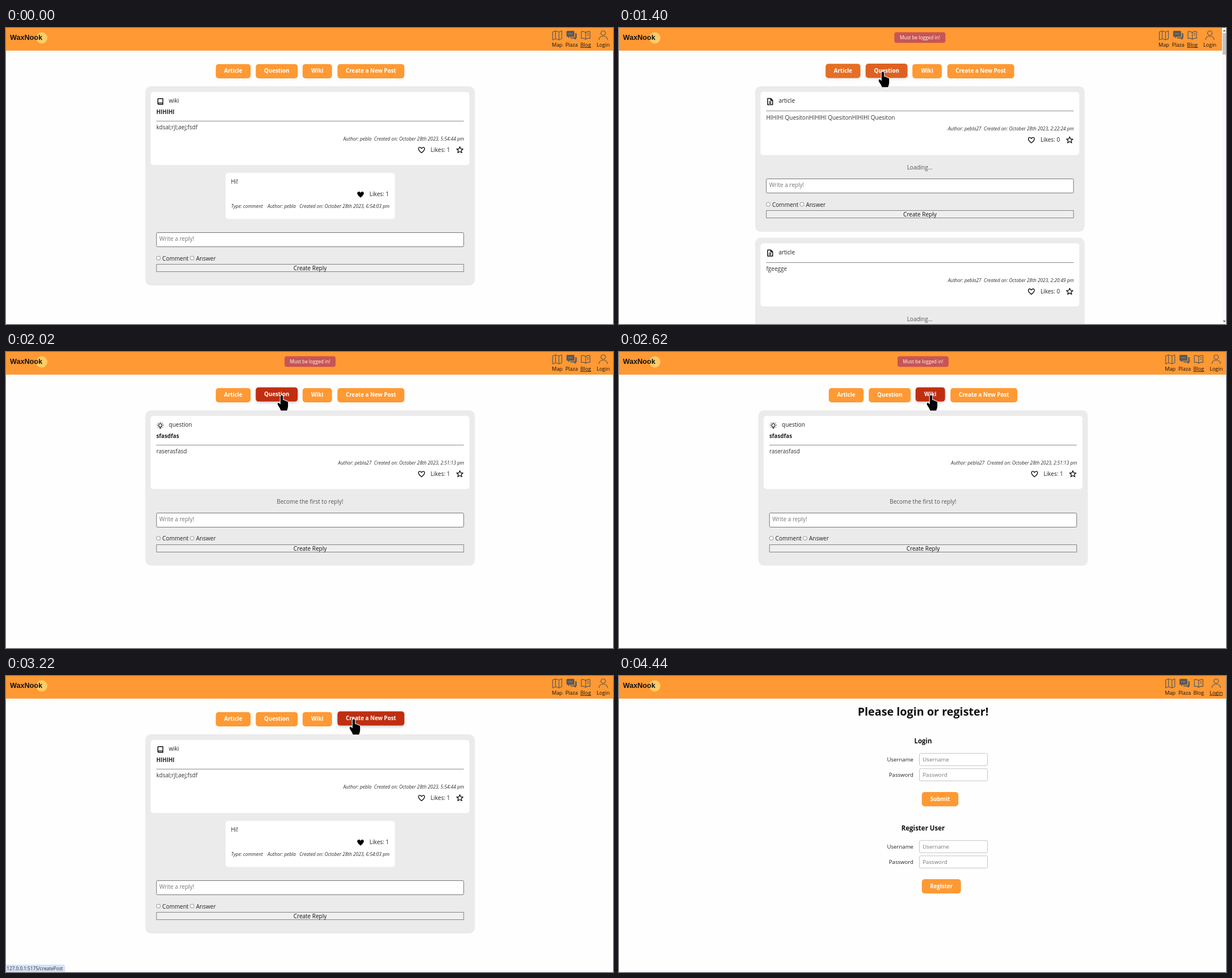
Recreate the animation shown at these times as an HTML page with a canvas. Size 1070 by 523 pixels, loop 5.04 s.

```html
<!DOCTYPE html>
<html lang="en">
<head>
<meta charset="utf-8">
<title>Blog walkthrough</title>
<style>
html, body { margin: 0; width: 100%; height: 100%; overflow: hidden; background: #fff; }
canvas { display: block; }
</style>
</head>
<body>
<canvas id="stage" width="1070" height="523"></canvas>
<script>
const ctx = document.getElementById('stage').getContext('2d');
const LOOP = 5040;
const ORANGE = '#ff9933';
const SANS = '"Open Sans", "Noto Sans", sans-serif';
const REG = `10px ${SANS}`;
const FORM = `9.65px ${SANS}`;
const BOLD = `bold 9.75px ${SANS}`;
const META = `italic 8.35px ${SANS}`;
const NAV = `9.1px ${SANS}`;

const POSTS = {
  wiki: [{
    kind: 'wiki', title: 'HIHIHI', body: 'kdsal;rjl;aej;fsdf', author: 'pebla',
    date: 'October 28th 2023, 5:54:44 pm', likes: 1, comment: true
  }],
  question: [{
    kind: 'question', title: 'sfasdfas', body: 'raserasfasd', author: 'pebla27',
    date: 'October 28th 2023, 2:51:13 pm', likes: 1
  }],
  article: [{
    kind: 'article', body: 'HIHIHI Quesiton'.repeat(3), author: 'pebla27',
    date: 'October 28th 2023, 2:22:24 pm', likes: 0
  }, {
    kind: 'article', body: 'fgeegge', author: 'pebla27',
    date: 'October 28th 2023, 2:20:49 pm', likes: 0
  }]
};

// hover: [article, question, wiki, create], 0 = idle, 1 = fully hovered
const STEPS = [
  { t: 0, page: 'wiki' },
  { t: 200, page: 'wiki', arrow: [875, 370] },
  { t: 400, page: 'wiki', arrow: [566, 164] },
  { t: 600, page: 'wiki', arrow: [470, 107] },
  { t: 800, page: 'wiki', arrow: [374, 73] },
  { t: 1000, page: 'wiki', hand: [418, 80], hover: [1, 0, 0, 0] },
  { t: 1400, page: 'article', hand: [465, 78], hover: [.4, .52, 0, 0], toast: true, loading: true },
  { t: 1600, page: 'article', hand: [486, 77], hover: [0, .92, 0, 0], toast: true },
  { t: 1800, page: 'article', hand: [486, 77], hover: [0, 1, 0, 0], toast: true },
  { t: 2020, page: 'question', hand: [486, 77], hover: [0, 1, 0, 0], toast: true },
  { t: 2220, page: 'question', hand: [534, 77], hover: [0, .4, .5, 0], toast: true },
  { t: 2420, page: 'question', hand: [550, 77], hover: [0, 0, .92, 0], toast: true },
  { t: 2620, page: 'question', hand: [550, 77], hover: [0, 0, 1, 0], toast: true },
  { t: 2820, page: 'wiki', hand: [596, 77], hover: [0, 0, .4, .5], toast: true },
  { t: 3020, page: 'wiki', hand: [613, 77], hover: [0, 0, 0, 1], status: 104, ink: .5 },
  { t: 3220, page: 'wiki', hand: [613, 77], hover: [0, 0, 0, 1], status: 104, ink: 1 },
  { t: 3420, page: 'login', arrow: [613, 76], status: 356, ink: 1 },
  { t: 3840, page: 'login', arrow: [613, 76] },
  { t: 4040, page: 'login', arrow: [912, 393] },
  { t: 4240, page: 'login', arrow: [983, 451] },
  { t: 4440, page: 'login' }
];

const TABS = [
  ['Article', 370, 61], ['Question', 440.5, 73.5], ['Wiki', 523, 51.5], ['Create a New Post', 584.5, 117.5]
];

const shape = d => new Path2D(d);
const ICONS = {
  heart: shape('M0 5C-7 0-6-4.6-3.2-4.6C-1.6-4.6-.6-3.6 0-2.6C.6-3.6 1.6-4.6 3.2-4.6C6-4.6 7 0 0 5Z'),
  star: shape('M0-5.6L1.6-1.8L5.7-1.5L2.6 1.2L3.6 5.2L0 3L-3.6 5.2L-2.6 1.2L-5.7-1.5L-1.6-1.8Z'),
  wiki: shape('M-4.3 3.6V-4Q-4.3-5.2-3-5.2H4.5V5H-3Q-4.3 5-4.3 3.6Q-4.3 2.4-3 2.4H4.5'),
  article: shape('M-4.4-5.4H1.2L4.4-2.2V5.5H-4.4ZM1-5.2V-2H4.2M-2 .4H2M-2 3H2'),
  question: shape('M-1.3 3.2V2A2.9 2.9 0 1 1 1.3 2V3.2ZM-1.2 5.2H1.2M0-6V-4.7M-6-.8H-4.6M6-.8H4.6M-4.4-4.7L-3.5-3.8M4.4-4.7L3.5-3.8M-4.5 3.4L-3.6 2.6M4.5 3.4L3.6 2.6'),
  map: shape('M-8-6L-3-8L3-6L8-8V6L3 8L-3 6L-8 8ZM-3-8V6M3-6V8'),
  chat: shape('M-9-8H3.5Q5-8 5-6.5V1Q5 2.5 3.5 2.5H-3L-6 5V2.5H-7.5Q-9 2.5-9 1V-6.5Q-9-8-7.5-8ZM6.4-4H7.5Q9-4 9-2.5V4Q9 5.5 7.5 5.5V8L4 5.5H-1Q-2.4 5.5-2.6 3.8H4Q6.4 3.8 6.4 1.5Z'),
  book: shape('M0-5Q-3-7.4-7.6-6.6V5.4Q-3 4.6 0 7Q3 4.6 7.6 5.4V-6.6Q3-7.4 0-5V7M2.5-2.8L5.4-3.5M2.5 0L5.4-.7'),
  user: shape('M4-4A4 4 0 1 1-4-4A4 4 0 1 1 4-4ZM-7.5 8Q-7 1.5 0 1.5Q7 1.5 7.5 8'),
  arrow: shape('M0 0V21L5 17L8.3 24.2L11.6 22.7L8.5 15.7H15.5Z'),
  hand: shape('M-2.2 1.4Q-2-.7 0-.7Q2-.7 2.2 1.4V8.2Q4.8 7.2 5.6 9.2Q8 8.4 8.6 10.4Q11.2 9.8 11.2 12.4V19Q10.8 22.4 9.2 26.4H-1.4Q-2.8 22.4-6.8 16.8Q-8.2 13.6-6 12.8Q-4.4 12.6-2.2 15.8Z')
};

function text(str, x, y, font = REG, color = '#222', align = 'left') {
  ctx.font = font;
  ctx.fillStyle = color;
  ctx.textAlign = align;
  ctx.fillText(str, x, y);
}

function box(x, y, w, h, r, fill, line, width = 1) {
  ctx.beginPath();
  ctx.roundRect(x, y, w, h, r);
  if (fill) { ctx.fillStyle = fill; ctx.fill(); }
  if (line) { ctx.strokeStyle = line; ctx.lineWidth = width; ctx.stroke(); }
}

function icon(name, x, y, { fill, line, width = 1.4 }) {
  ctx.save();
  ctx.translate(x, y);
  ctx.lineJoin = 'round';
  if (line) { ctx.strokeStyle = line; ctx.lineWidth = width; ctx.stroke(ICONS[name]); }
  if (fill) { ctx.fillStyle = fill; ctx.fill(ICONS[name]); }
  ctx.restore();
}

function mix(a, b, k) {
  return `rgb(${a.map((v, i) => Math.round(v + (b[i] - v) * k))})`;
}

function button(label, x, y, w, hover = 0) {
  ctx.save();
  ctx.translate(0, -1.3 * hover);
  if (hover) {
    ctx.shadowColor = `rgba(0,0,0,${.2 * hover})`;
    ctx.shadowBlur = 5;
    ctx.shadowOffsetY = 2;
  }
  box(x - .2, y - .3, w + .4, 25.2, 5, mix([255, 153, 51], [192, 46, 16], hover));
  ctx.shadowColor = 'transparent';
  text(label, x + w / 2, y + 15.4, BOLD, '#fff', 'center');
  ctx.restore();
}

function header(page, shift) {
  box(0, 0, 1070, 40, 0, ORANGE);
  ctx.beginPath();
  ctx.arc(63, 17.5, 10, 0, 7);
  ctx.fillStyle = '#ffcc66';
  ctx.fill();
  text('WaxNook', 7, 21, 'bold 12.6px "Liberation Sans", Arial, sans-serif', '#111');

  const grey = '#5a5a5a';
  const items = [['Map', 'map', 971.7], ['Plaza', 'chat', 997], ['Blog', 'book', 1021.8], ['Login', 'user', 1052.7]];
  for (const [label, name, cx] of items) {
    const x = cx + shift;
    icon(name, x, 13, name === 'chat' ? { fill: grey } : { line: grey, width: 1.2 });
    text(label, x, 33, NAV, '#111', 'center');
    if (label === (page === 'login' ? 'Login' : 'Blog')) {
      const w = ctx.measureText(label).width;
      ctx.fillRect(x - w / 2, 34, w, .8);
    }
  }
  ctx.fillStyle = ORANGE;
  for (const dx of [-4.5, -2, .5]) ctx.fillRect(996 + dx + shift, 9.6, 1.3, 1.3);
}

function comment(y) {
  box(387, y, 298.5, 81.5, 5, '#fff');
  text('Hi!', 396.5, y + 19);
  icon('heart', 625, y + 38.2, { fill: '#000', line: '#000', width: 1 });
  text('Likes: 1', 675, y + 41.4, REG, '#222', 'right');
  text('Type: comment', 397, y + 62.3, META, '#333');
  text('Author: pebla', 461, y + 62.3, META, '#333');
  text('Created on: October 28th 2023, 6:54:03 pm', 676, y + 62.3, META, '#333', 'right');
}

function radio(label, x, y) {
  ctx.beginPath();
  ctx.arc(x, y, 3.5, 0, 7);
  ctx.fillStyle = '#fff';
  ctx.fill();
  ctx.strokeStyle = '#767676';
  ctx.lineWidth = .8;
  ctx.stroke();
  text(label, x + 7, y + 4);
}

// Draws one post and returns the top of the next one.
function post(p, top, loading) {
  const rule = top + (p.title ? 61.3 : 43.8);
  const form = rule + (p.comment ? 77.4 : 0);
  const end = form + 213.3;
  box(245.5, top, 581, end - top, 10, '#ebebeb');
  box(255, top + 10, 562, rule + 77.6 - top - 10, 5, '#fff');

  icon(p.kind, 272, top + 27, { line: '#111', width: p.kind === 'question' ? 1.2 : 1.5 });
  text(p.kind, 287, top + 29.4);
  if (p.title) text(p.title, 265, top + 49, BOLD);
  ctx.fillStyle = '#8c8c8c';
  ctx.fillRect(265, Math.floor(rule - .3), 542, 1);
  text(p.body, 265, rule + 14.7, REG, '#333');
  text(`Author: ${p.author}  Created on: ${p.date}`, 807.5, rule + 34.4, META, '#333', 'right');
  icon('heart', 732.5, rule + 51.2, { line: '#111' });
  text(`Likes: ${p.likes}`, 782.7, rule + 54.4, REG, '#222', 'right');
  icon('star', 800, rule + 51, { line: '#111', width: 1.3 });

  if (p.comment) comment(rule + 91.7);
  else text(loading ? 'Loading...' : 'Become the first to reply!', 535.8, rule + 103.3, REG, '#555', 'center');

  box(265.3, Math.floor(form + 120) + .5, 541.5, 25, 2, '#fff', '#767676');
  text('Write a reply!', 270.3, form + 134.4, REG, '#757575');
  radio('Comment', 268.6, form + 164.8);
  radio('Answer', 328, form + 164.8);
  box(265.3, Math.floor(form + 176) + .5, 541.5, 13, 0, '#efefef', '#767676', .9);
  text('Create Reply', 536, form + 186.3, REG, '#111', 'center');
  return end + 10.5;
}

function blog(s) {
  const hover = s.hover || [0, 0, 0, 0];
  TABS.forEach(([label, x, w], i) => button(label, x, 64, w, hover[i]));
  let top = 103;
  for (const p of POSTS[s.page]) top = post(p, top, s.loading);
}

function form(title, top, action, width) {
  text(title, 536, top, `bold 11.5px ${SANS}`, '#111', 'center');
  ['Username', 'Password'].forEach((label, i) => {
    const y = top + 17.5 + i * 27;
    text(label, 519, y + 13.8, FORM, '#222', 'right');
    box(529.5, y, 120, 21.5, 2, '#fff', '#c4c4c4');
    text(label, 535.3, y + 13.8, FORM, '#757575');
  });
  button(action, 534, top + 86, width);
}

function login() {
  text('Please login or register!', 536, 70.2, `bold 19.75px ${SANS}`, '#111', 'center');
  form('Login', 119.3, 'Submit', 64);
  form('Register User', 273.3, 'Register', 68.5);
}

function scrollbar() {
  box(1063, 0, 7, 523, 0, '#fafafa');
  box(1064, 9, 6, 38, 0, '#c1c1c1');
  ctx.fillStyle = '#606060';
  ctx.fill(shape('M1064.5 6L1067 3L1069.5 6ZM1064.5 517L1067 520L1069.5 517Z'));
}

function toast(shift) {
  box(491 + shift, 7.5, 90, 18.7, 4, '#c75555');
  text('Must be logged in!', 536 + shift, 20, `8.3px ${SANS}`, '#fff', 'center');
}

function statusBar(width, ink) {
  box(0, 510, width, 13, [0, 3, 0, 0], '#d5e2fb');
  ctx.globalAlpha = ink;
  text('127.0.0.1:5175/createPost', 1.3, 520, `8.2px ${SANS}`, '#333');
  ctx.globalAlpha = 1;
}

function draw(s) {
  const shift = s.page === 'article' ? -5.6 : 0;
  box(0, 0, 1070, 523, 0, '#fefefe');
  header(s.page, shift * 2);
  ctx.save();
  ctx.translate(shift, 0);
  if (s.page === 'login') login();
  else blog(s);
  ctx.restore();
  if (shift) scrollbar();
  if (s.toast) toast(shift);
  if (s.status) statusBar(s.status, s.ink);
  for (const name of ['arrow', 'hand']) {
    if (s[name]) icon(name, ...s[name], { fill: '#000', line: '#fff', width: 2 });
  }
}

function tick() {
  const t = performance.now() % LOOP;
  draw(STEPS.findLast(s => s.t <= t));
  requestAnimationFrame(tick);
}
tick();
</script>
</body>
</html>
```
